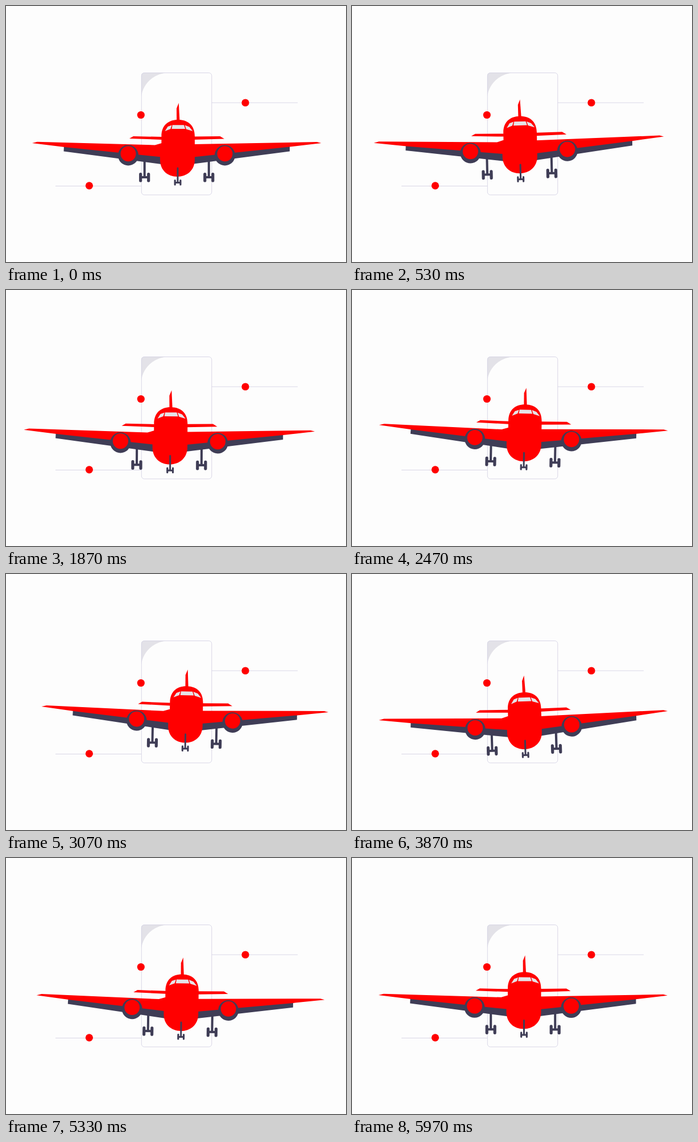
An HTML page for the animation above (6.01 s loop, 598 px wide and 450 px high).

```html
<!DOCTYPE html>
<html lang="en">
<head>
<meta charset="utf-8">
<title>Plane in flight</title>
<style>
  html, body { margin: 0; width: 100%; height: 100%; overflow: hidden; background: #fdfdfd; }
  svg { display: block; width: 100%; height: 100%; }
  .red { fill: #f00; }
  .dark { fill: #3f3d56; }
  .glass { fill: #e5e4e8; }
  .thin { fill: none; stroke: #d0cde1; stroke-width: .8; }
  .strut { fill: none; stroke: #3f3d56; stroke-linecap: round; }
</style>
</head>
<body>
<svg viewBox="0 0 598 450">
  <defs>
    <g id="gear" class="strut">
      <path d="M0 272V301M-7 301H7" stroke-width="4"/>
      <path d="M-7 295.500V307M7 295.500V307" stroke-width="5.200"/>
    </g>
    <g id="engine">
      <circle class="dark" cy="262.500" r="18"/>
      <circle class="red" cy="259.800" r="13.500"/>
    </g>
  </defs>

  <path fill="#e3e2e8" d="M238 160V122Q238 117.500 243 117.500H282C258 120 240 138 238 160Z"/>
  <rect class="thin" x="238.300" y="117.500" width="123.500" height="214.500" rx="5"/>
  <path class="thin" d="M362 170H513M87 316.500H238"/>
  <g class="red">
    <circle cx="421" cy="170" r="6.600"/>
    <circle cx="237.300" cy="191.500" r="6.600"/>
    <circle cx="146.400" cy="315.800" r="6.600"/>
  </g>

  <g id="plane">
    <path class="dark" d="M102 246L273 263V278L101.500 255.500ZM499 246L330 263V277.500L499 255.500Z"/>
    <use href="#gear" x="243.700"/>
    <use href="#gear" x="356.800"/>
    <g class="red">
      <path d="M217 233L224 229L274 230V235ZM384 233.500L376.500 229L330 229.500V235Z"/>
      <path d="M300.200 203L300 180L303.800 170.500L305.500 203Z"/>
      <path d="M46 241L55 238.700L262 244.500L274 241V265.500L103 248ZM554.500 241L547 239L330 243V265.500L499 247.500Z"/>
      <path d="M273.400 229C273.400 210 285 200 302.700 200S332 210 332 229V270C332 289 318 300 301.300 300S271 289 271 270V247L273.400 244Z"/>
    </g>
    <path class="glass" d="M279.500 220L284.500 212L291.500 209.500L289.500 216ZM292.700 209.200H313L315.300 216H291.500ZM314.500 209.500L322.500 212.500L328.500 220L317 216.500Z"/>
    <use href="#engine" x="215"/>
    <use href="#engine" x="385"/>
    <g class="strut">
      <path d="M302 285V310M297.500 310.500H306.500" stroke-width="3"/>
      <path d="M297.200 306.500V314M306.900 306.500V314" stroke-width="3.200"/>
    </g>
  </g>
</svg>
<script>
  const LOOP = 6010, CX = 300, CY = 241;
  // time in ms, offset x, offset y, bank in degrees
  const KEYS = [
    [0, 0, 0, 0],
    [550, -7, -6, -1.3],
    [1070, -8, -0.5, -1.92],
    [1870, -13, 6.2, 0.34],
    [3070, 14.5, -3, 1.14],
    [3870, 1, 8, -1.81],
    [4670, -15.5, -9.5, -1.01],
    [5400, 8, 5, 1]
  ];
  const plane = document.getElementById("plane");

  // Key at any index, wrapped around the loop
  function key(i) {
    const n = KEYS.length, turn = Math.floor(i / n);
    const [t, ...values] = KEYS[i - turn * n];
    return [t + turn * LOOP, ...values];
  }

  // Smooth closed curve through the keys
  function pose(t) {
    const i = KEYS.findLastIndex(k => k[0] <= t);
    const [a, b, c, d] = [-1, 0, 1, 2].map(j => key(i + j));
    const span = c[0] - b[0], u = (t - b[0]) / span;
    return [1, 2, 3].map(k => {
      const m0 = (c[k] - a[k]) / (c[0] - a[0]) * span;
      const m1 = (d[k] - b[k]) / (d[0] - b[0]) * span;
      const rise = c[k] - b[k];
      return b[k] + u * (m0 + u * (3 * rise - 2 * m0 - m1 + u * (m0 + m1 - 2 * rise)));
    });
  }

  function draw() {
    const [x, y, bank] = pose(performance.now() % LOOP);
    const size = 1 - x * 0.0005;
    plane.setAttribute("transform",
      `translate(${CX + x} ${CY + y}) rotate(${bank}) scale(${size}) translate(${-CX} ${-CY})`);
    requestAnimationFrame(draw);
  }
  draw();
</script>
</body>
</html>
```
